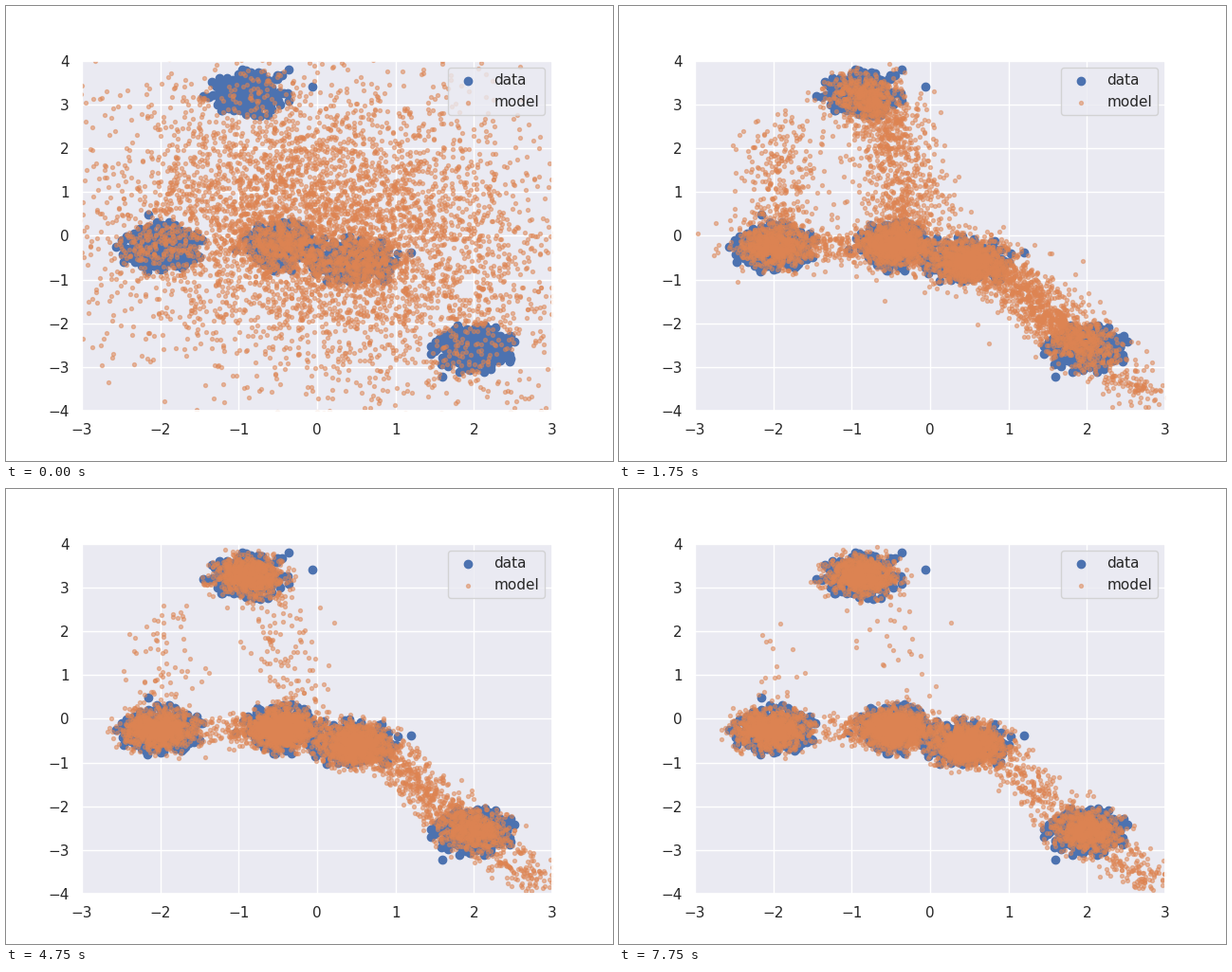
A matplotlib script that plays this animation: 640 px wide and 480 px high, repeating every 8 s.

```python
import numpy as np
import matplotlib.pyplot as plt
from matplotlib.animation import FuncAnimation

FRAMES, INTERVAL = 32, 250
PAGE, PANEL, INK = "white", "#eaeaf2", "#262626"
BLUE, ORANGE = "#4c72b0", "#dd8452"

rng = np.random.default_rng(7)

TOP, LEFT, MID = (-0.88, 3.28), (-2.03, -0.25), (-0.47, -0.22)
NEAR, FAR = (0.48, -0.58), (2.0, -2.56)
CLUSTERS = (TOP, LEFT, MID, NEAR, FAR)


def blob(center, n, sigma=0.2, limit=2.9):
    """Gaussian cloud whose radius is capped at limit sigmas."""
    pts = rng.normal(size=(n, 2))
    radius = np.hypot(*pts.T)[:, None]
    return np.array(center) + sigma * pts * np.minimum(1, limit / radius)


def core(center, n, early=0.0):
    """Points that settle in a cluster; a share of them is there early."""
    pts = blob(center, n, 0.22)
    return pts, pts, np.full(n, np.inf), rng.random(n) < early


def strand(a, b, ends, n, width, mean_life):
    """Points strung from a to b that drain into the nearer end's cluster."""
    a, b = np.array(a), np.array(b)
    s = rng.random((n, 1))
    side = np.array([a[1] - b[1], b[0] - a[0]]) / np.hypot(*(b - a))
    path = a + s * (b - a) + rng.normal(0, width, (n, 1)) * side
    home = np.where(s < 0.5, blob(ends[0], n), blob(ends[1], n))
    life = 2 + rng.exponential(mean_life, n)
    return path, home, life, np.zeros(n, bool)


data = np.vstack([blob(c, 450) for c in CLUSTERS])
strays = [(-0.06, 3.41), (-0.36, 3.8), (-2.15, 0.49), (1.2, -0.38), (1.6, -3.22)]
data = np.vstack([data, strays])

parts = [
    core(TOP, 350, 0.1),
    core(LEFT, 650, 0.2),
    core(MID, 900, 0.35),
    core(NEAR, 1000, 0.35),
    core(FAR, 300, 0.1),
    strand((-0.6, 3.0), (-0.25, 0.15), (TOP, MID), 1050, 0.24, 8),
    strand((-2.0, 0.2), (-1.95, 2.8), (LEFT, LEFT), 380, 0.26, 9),
    strand((-1.6, -0.25), (-0.95, -0.28), (LEFT, MID), 120, 0.18, 38),
    strand((0.85, -0.7), (1.8, -2.35), (NEAR, FAR), 900, 0.18, 20),
    strand((2.2, -2.85), (2.95, -3.85), (FAR, FAR), 150, 0.18, 300),
]
path, home, life, early = map(np.concatenate, zip(*parts))
count = len(path)

# Early points start near their place, all others in one wide cloud.
begin = 0.6 * path + (0.25, 0.1) + rng.normal(size=(count, 2)) * (1.25, 1.35)
begin[early] = path[early] + rng.normal(0, 0.17, (early.sum(), 2))
tau = rng.gamma(6, 2.7 / 6, count)
phase = rng.uniform(0, 2 * np.pi, (count, 2))
speed = rng.uniform(0.5, 1.6, (count, 2))


def model_points(t):
    drain = np.clip((t - life) / 3, 0, 1)
    drain = (drain * drain * (3 - 2 * drain))[:, None]
    goal = path + drain * (home - path)
    loose = np.exp(-t / tau)[:, None]
    wobble = 0.05 * np.sin(speed * t + phase)
    return goal + loose * (begin - goal) + wobble


plt.rcParams.update({"font.family": "DejaVu Sans", "font.size": 11,
                     "text.color": INK})
fig = plt.figure(figsize=(6.4, 4.8), dpi=100, facecolor=PAGE)
ax = fig.add_axes([0.125, 0.11, 0.775, 0.77], facecolor=PANEL)
ax.set(xlim=(-3, 3), ylim=(-4, 4), xticks=range(-3, 4), yticks=range(-4, 5))
ax.set_axisbelow(True)
ax.grid(color="white", linewidth=1)
ax.tick_params(length=0, pad=9.5, labelcolor=INK)
for spine in ax.spines.values():
    spine.set(color="white", linewidth=1.25)

ax.scatter(*data.T, s=36, color=BLUE, linewidths=1, label="data")
model = ax.scatter(*model_points(0).T, s=8, color=ORANGE, alpha=0.5,
                   linewidths=1, label="model")
ax.legend(loc="upper right", facecolor=PANEL, edgecolor="0.8", framealpha=0.8)


def draw(t):
    model.set_offsets(model_points(t))
    return model,


anim = FuncAnimation(fig, draw, frames=FRAMES, interval=INTERVAL,
                     repeat=True, repeat_delay=0, blit=False)
plt.show()
```
